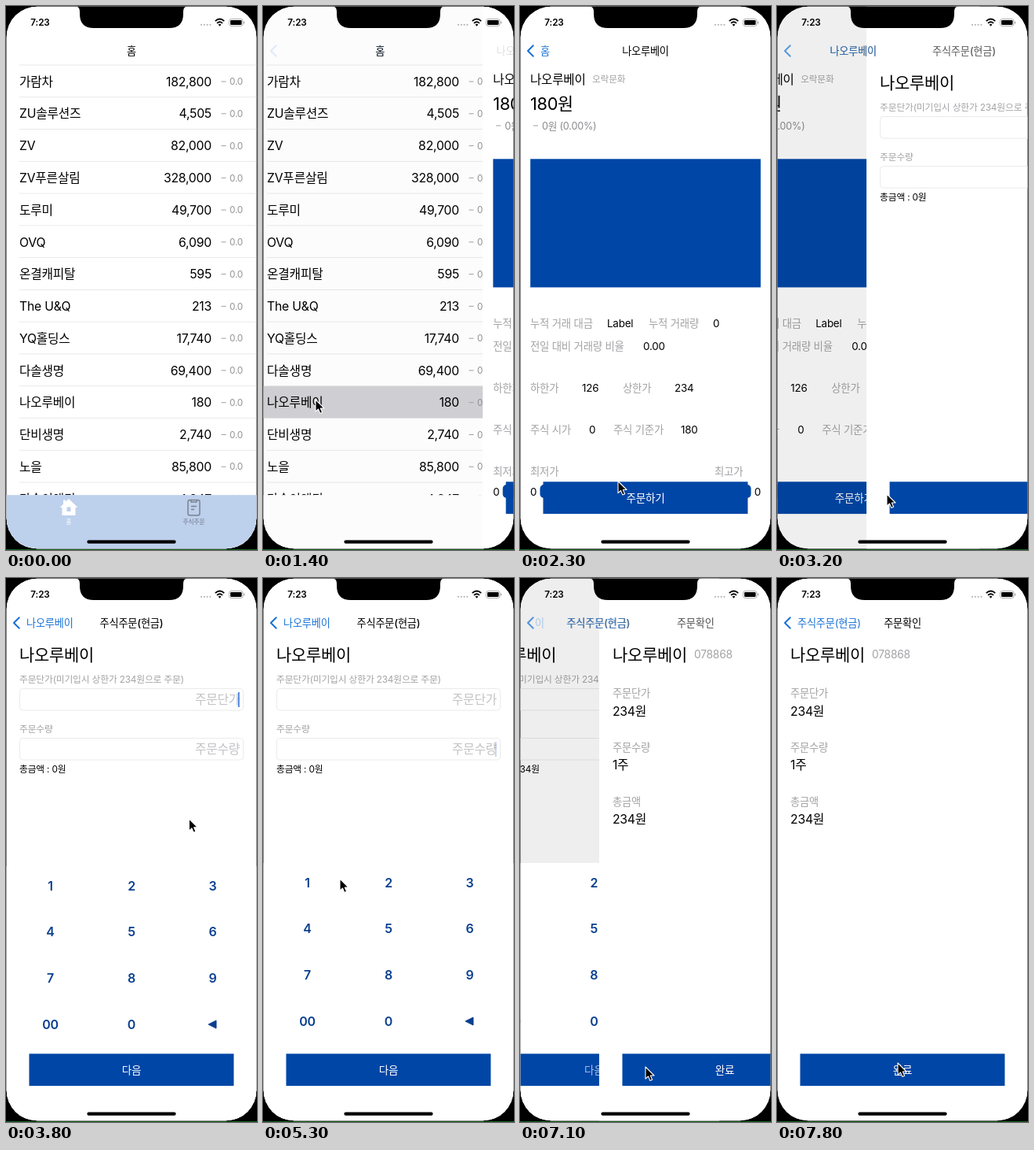
Animation of 320x691 px, one loop 8000 ms. Source, as an HTML page:

```html
<!DOCTYPE html>
<html lang="ko">
<head>
<meta charset="utf-8">
<title>주식주문</title>
<style>
html, body { margin: 0; width: 100%; height: 100%; overflow: hidden; background: #000; }
svg { display: block; width: 100vw; height: 100vh; }
text { font-family: Inter, "Noto Sans CJK KR", "Noto Sans CJK", sans-serif; letter-spacing: -.016em; white-space: pre; }
</style>
</head>
<body>
<svg id="stage" viewBox="0 0 320 691">
  <defs>
    <clipPath id="screen"><rect x=".7" y=".7" width="318.6" height="688.6" rx="39"/></clipPath>
    <clipPath id="backArea"><rect x="18" y="40" width="302" height="34"/></clipPath>
  </defs>
</svg>
<script>
const LOOP = 8000, STEP = 100;
const BLUE = '#0046a6', KEY = '#0a3f8f', LINK = '#1a72d6', GREY = '#a3a3a6', INK = '#000';
const STOCK = '나오루베이';
const svg = document.getElementById('stage');

function add(parent, tag, attrs) {
  const node = document.createElementNS('http://www.w3.org/2000/svg', tag);
  set(node, attrs);
  parent.appendChild(node);
  return node;
}
function set(node, attrs) {
  for (const k in attrs) node.setAttribute(k, attrs[k]);
}
const group = (parent, attrs = {}) => add(parent, 'g', attrs);
const rect = (parent, x, y, width, height, fill, more = {}) =>
  add(parent, 'rect', { x, y, width, height, fill, ...more });
const path = (parent, d, attrs) => add(parent, 'path', { d, ...attrs });

// y is the vertical middle of the line
function text(parent, str, x, y, size, fill = INK, anchor = 'start', weight = 400) {
  const node = add(parent, 'text', {
    x, y: y + size * .36, fill, 'font-size': size, 'text-anchor': anchor, 'font-weight': weight
  });
  node.textContent = str;
  return node;
}
const minus = (parent, x, y) => rect(parent, x, y - .5, 6, 1, '#a0a0a3');

rect(svg, 0, 0, 320, 691, '#000');
rect(svg, 0, 690, 320, 1, '#14601f');
const screen = group(svg, { 'clip-path': 'url(#screen)' });
rect(screen, 0, 0, 320, 691, '#fff');

function makePage(build, dimHeight = 691) {
  const g = group(screen);
  rect(g, 0, 0, 320, 691, '#fff');
  build(g);
  const dim = rect(g, 0, 0, 320, dimHeight, '#000', { opacity: 0 });
  return { g, dim };
}
function button(parent, label) {
  rect(parent, 29.5, 604.3, 260.9, 40.8, BLUE);
  return text(parent, label, 160, 625, 13.6, '#fff', 'middle');
}

let highlight, tabBar, orderLabel, nextLabel, keypad, total, qtyHint, qty, caret;

const stocks = [
  ['가람차', '182,800'], ['ZU솔루션즈', '4,505'], ['ZV', '82,000'], ['ZV푸른살림', '328,000'],
  ['도루미', '49,700'], ['OVQ', '6,090'], ['온결캐피탈', '595'], ['The U&Q', '213'],
  ['YQ홀딩스', '17,740'], ['다솔생명', '69,400'], [STOCK, '180'], ['단비생명', '2,740'],
  ['노을', '85,800'], ['다솔이앤티', '4,347']
];

function buildHome(g) {
  const pitch = 40.77;
  highlight = rect(g, 0, 75 + 10 * pitch, 320, pitch, '#d1d1d5');
  stocks.forEach(([name, price], i) => {
    const y = 96 + i * pitch;
    rect(g, 17, 74.6 + i * pitch, 303, .8, '#e4e4e6');
    text(g, name, 17, y, 15.8);
    text(g, price, 262, y, 15.8, INK, 'end');
    minus(g, 274.5, y);
    text(g, '0.0', 302, y, 11.7, '#929295', 'end');
  });
  rect(g, 0, 621.2, 320, 70, '#fff');

  tabBar = group(g);
  rect(tabBar, 0, 621.2, 320, 70, '#bdd0ec');
  path(tabBar, 'M80 626L91.5 637H88.5V647H71.5V637H68.5L73 632.7V627.5H76V629.8ZM77.5 636.5V642H82.5V636.5Z',
    { fill: '#fff', 'fill-rule': 'evenodd' });
  text(tabBar, '홈', 80, 655.5, 7.6, '#fff', 'middle', 500);
  const icon = { fill: 'none', stroke: '#7a8391', 'stroke-width': 1.5 };
  rect(tabBar, 232, 627.5, 15, 19.5, 'none', { ...icon, rx: 2.5 });
  path(tabBar, 'M236 627.5V630H243V627.5M236 635.5H243M236 639.5H240', icon);
  text(tabBar, '주식주문', 239.5, 655.5, 7.7, '#6f7887', 'middle');
}

function buildDetail(g) {
  text(g, STOCK, 13, 93, 15.6);
  text(g, '오락문화', 92, 93, 11.7, GREY);
  text(g, '180원', 13, 124, 21.8);
  minus(g, 17, 152);
  text(g, '0원 (0.00%)', 28, 152, 12.6, '#8a8a8d');
  rect(g, 13.2, 194.3, 293.6, 163.1, BLUE);
  const lines = [
    [403, '누적 거래 대금', 13, 'Label', 111, '누적 거래량', 164, '0', 246],
    [432, '전일 대비 거래량 비율', 13, '0.00', 157],
    [485, '하한가', 13, '126', 79, '상한가', 131, '234', 197],
    [538, '주식 시가', 13, '0', 88, '주식 기준가', 119, '180', 205]
  ];
  for (const [y, ...cells] of lines) {
    for (let i = 0; i < cells.length; i += 2) {
      text(g, cells[i], cells[i + 1], y, 13.4, i % 4 ? INK : GREY);
    }
  }
  text(g, '최저가', 13, 591, 13.4, GREY);
  text(g, '최고가', 248, 591, 13.4, GREY);
  text(g, '0', 13, 617, 13.4);
  text(g, '0', 307, 617, 13.4, INK, 'end');
  rect(g, 25.5, 608, 269, 17, BLUE, { rx: 5 });
  orderLabel = button(g, '주문하기');
}

function field(g, y, hint) {
  rect(g, 17.5, y, 285, 27.5, '#fff', { rx: 4, stroke: '#eaeaec', 'stroke-width': 1 });
  return text(g, hint, 298, y + 14, 15.8, '#c3c3c6', 'end');
}

function buildOrder(g) {
  text(g, STOCK, 17, 97, 21);
  text(g, '주문단가(미기입시 상한가 234원으로 주문)', 17, 129, 11.8, GREY);
  field(g, 140.5, '주문단가');
  text(g, '주문수량', 17, 192, 11.8, GREY);
  qtyHint = field(g, 203.5, '주문수량');
  qty = text(g, '1', 296, 217.5, 15.8, INK, 'end');
  caret = rect(g, 296, 145, 1.6, 19, '#3a76d8');
  total = text(g, '', 17, 243, 11.8);

  keypad = group(g);
  rect(keypad, 0, 362, 320, 329, '#fff');
  ['1', '2', '3', '4', '5', '6', '7', '8', '9', '00', '0'].forEach((key, i) => {
    text(keypad, key, 56.5 + 103.5 * (i % 3), 387 + 58.6 * Math.floor(i / 3), 16, KEY, 'middle', 600);
  });
  path(keypad, 'M258 563L268 558V568Z', { fill: KEY, stroke: KEY, 'stroke-linejoin': 'round' });
  nextLabel = button(g, '다음');
}

function buildConfirm(g) {
  text(g, STOCK, 17, 97, 21);
  text(g, '078868', 121, 97, 13.8, GREY);
  [['주문단가', '234원'], ['주문수량', '1주'], ['총금액', '234원']].forEach(([label, value], i) => {
    text(g, label, 17, 146 + i * 69, 13.3, GREY);
    text(g, value, 17, 169 + i * 68.7, 15.8);
  });
  button(g, '완료');
}

const pages = [makePage(buildHome), makePage(buildDetail), makePage(buildOrder, 362), makePage(buildConfirm)];

// Navigation bar: title, its left edge, and how far it slides in from
const navLayer = group(screen);
const backLayer = group(screen, { 'clip-path': 'url(#backArea)' });
const nav = [['홈', 154, 0], [STOCK, 130, 191], ['주식주문(현금)', 119, 220], ['주문확인', 136, 202]]
  .map(([label, left, slide]) => ({
    left, slide,
    title: text(navLayer, label, 160, 57, 13.2, INK, 'middle', 500),
    back: text(backLayer, label, 26, 57, 13.2, LINK)
  }));
const chevron = path(navLayer, 'M16.8 50.3L10 57L16.8 63.7',
  { fill: 'none', stroke: LINK, 'stroke-width': 2, 'stroke-linecap': 'round', 'stroke-linejoin': 'round' });

// Status bar, notch and home indicator
const chrome = group(screen);
text(chrome, '7:23', 43.5, 21, 11.8, INK, 'middle', 600);
for (let i = 0; i < 4; i++) add(chrome, 'circle', { cx: 249 + i * 3.8, cy: 23.8, r: 1.1, fill: '#b5b5b7' });
const arc = { fill: 'none', stroke: '#000', 'stroke-width': 1.8 };
path(chrome, 'M266.8 19.2Q272.5 13.8 278.2 19.2', arc);
path(chrome, 'M269 21.8Q272.5 18.6 276 21.8', arc);
path(chrome, 'M270.6 23.6Q272.5 22 274.4 23.6L272.5 25.7Z', { fill: '#000' });
rect(chrome, 284.5, 16.5, 17.5, 9, 'none', { rx: 2.6, stroke: '#a8a8aa', 'stroke-width': .9 });
rect(chrome, 286, 18, 14.5, 6, '#000', { rx: 1.3 });
rect(chrome, 303, 19.4, 1.2, 3.2, '#a8a8aa', { rx: .6 });
path(chrome, 'M87 0Q94 0 94 7V10Q94 28 112 28H208Q226 28 226 10V7Q226 0 233 0Z', { fill: '#000' });
rect(chrome, 103.4, 678.6, 113.2, 4.1, '#000', { rx: 2 });

const cursor = path(screen, 'M0 0V15.2L3.5 12L5.8 17.4L8.6 16.2L6.3 11H11Z',
  { fill: '#000', stroke: '#fff', 'stroke-width': 1.1, 'stroke-linejoin': 'round' });

const route = [
  [500, 10, 488], [900, 67, 500], [1700, 67, 500], [2200, 109, 585], [2300, 125, 603.5],
  [2700, 140, 620], [3300, 140, 620], [3900, 252, 243], [4500, 275, 214], [4600, 275, 214],
  [5300, 98, 382], [5500, 66, 388], [5900, 54, 386], [6100, 54, 386], [6900, 160, 621],
  [7100, 160, 621], [7800, 154, 616]
];
function cursorAt(t) {
  const i = route.findIndex(k => k[0] > t);
  if (i < 0) return route[route.length - 1].slice(1);
  const a = route[Math.max(i - 1, 0)], b = route[i];
  const f = i ? (t - a[0]) / (b[0] - a[0]) : 0;
  return [a[1] + (b[1] - a[1]) * f, a[2] + (b[2] - a[2]) * f];
}

// Critically damped spring from 0 to 1
function spring(ms) {
  const s = ms * .016;
  return s <= 0 ? 0 : s > 9 ? 1 : 1 - (1 + s) * Math.exp(-s);
}
const clamp = v => Math.min(1, Math.max(0, v));
const show = (node, on) => set(node, { visibility: on ? 'visible' : 'hidden' });

function draw(t) {
  const push = [1, spring(t - 1362), spring(t - 3063), spring(t - 6952), 0, 0];

  pages.forEach(({ g, dim }, i) => {
    const enter = push[i], leave = push[i + 1];
    set(g, {
      transform: `translate(${320 * (1 - enter) - 96 * leave} 0)`,
      display: enter > 0 && leave < 1 ? 'inline' : 'none'
    });
    set(dim, { opacity: .1 * leave });
  });

  nav.forEach(({ title, back, left, slide }, i) => {
    const enter = push[i], leave = push[i + 1], gone = push[i + 2];
    const lag = leave === 1 ? 1 : Math.max(0, leave - .04);
    set(title, {
      x: 160 + slide * (1 - enter) - (left - 26) * lag,
      opacity: enter * (1 - leave * leave)
    });
    set(back, {
      x: 26 + (left - 26) * (1 - lag) - 80 * gone,
      opacity: leave * (1 - gone)
    });
  });
  const later = Math.max(push[2] * (1 - push[2]), push[3] * (1 - push[3]));
  set(chevron, { opacity: push[1] * (1 - 1.3 * later) });

  show(highlight, push[1] > 0);
  show(tabBar, push[1] === 0);
  set(orderLabel, { opacity: t >= 2900 && t < 3100 ? .4 : 1 });

  // The keypad rises once the order page is in place
  const rise = spring(t - 3400);
  set(keypad, { transform: `translate(0 ${330 * (1 - rise)})` });
  set(nextLabel, { opacity: t >= 6900 ? .65 : rise });
  const typed = t >= 5900;
  total.textContent = `총금액 : ${typed ? 234 : 0}원`;
  show(qtyHint, !typed);
  show(qty, typed);
  const blink = .5 + .5 * Math.cos((t - 4700) / 1000 * 2 * Math.PI);
  set(caret, { y: t < 4700 ? 145 : 208, opacity: t < 3500 || t >= 6950 ? 0 : clamp(blink * 1.4 + .2) });

  const [x, y] = cursorAt(t);
  set(cursor, { transform: `translate(${x} ${y})` });
  show(cursor, t >= 500);
}

const start = performance.now();
function tick(now) {
  const t = Math.max(0, now - start) % LOOP;
  draw(Math.floor(t / STEP) * STEP);
  requestAnimationFrame(tick);
}
draw(0);
requestAnimationFrame(tick);
</script>
</body>
</html>
```
